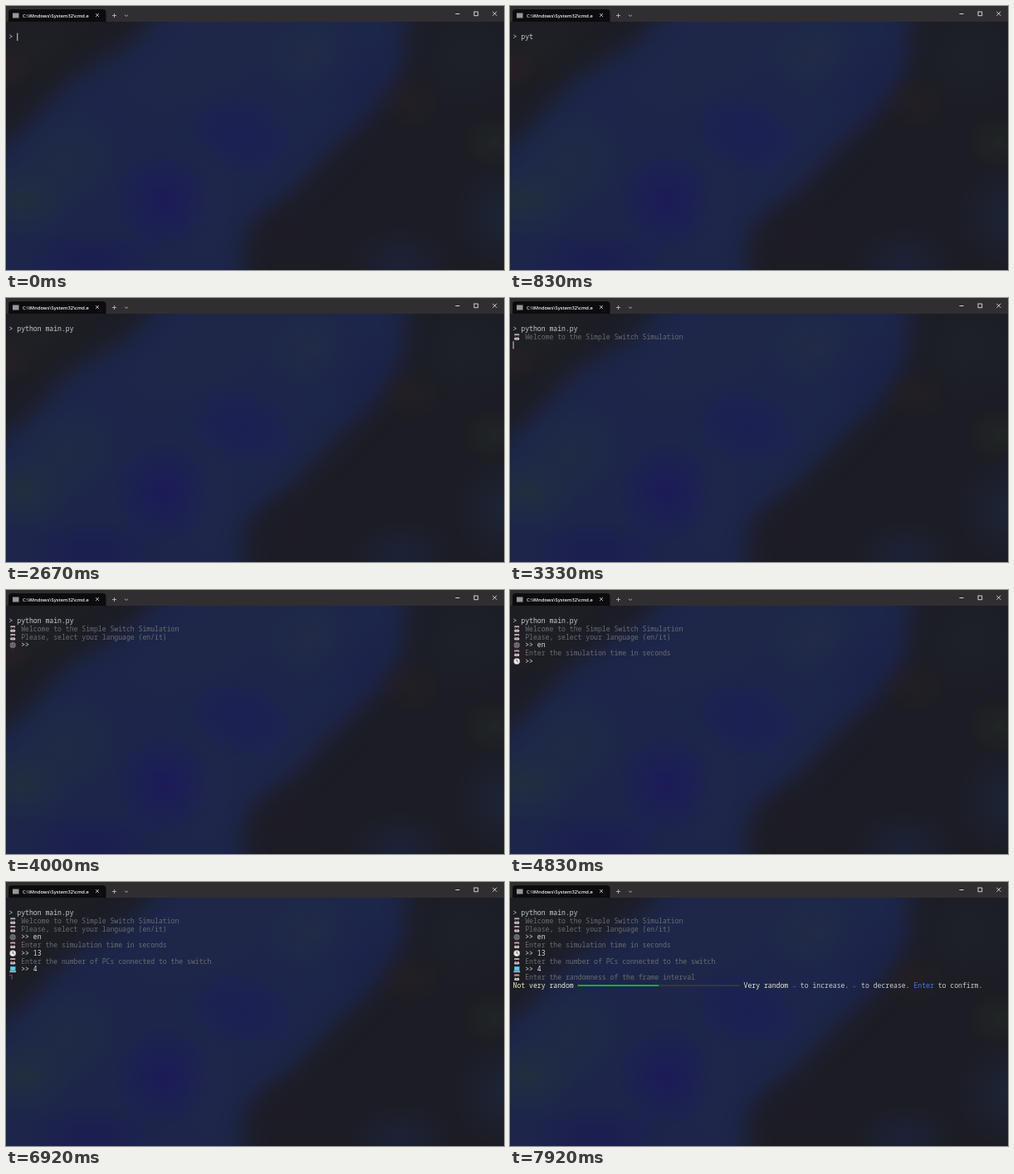
These frames come from a looping animation (600 by 319 pixels, 8000 ms). An HTML page with a canvas:

```html
<!DOCTYPE html>
<html lang="en">
<head>
<meta charset="utf-8">
<title>Terminal session</title>
<style>
html, body { margin: 0; width: 100%; height: 100%; overflow: hidden; background: #1d1f25; }
canvas { display: block; width: 600px; height: 319px; }
</style>
</head>
<body>
<canvas id="stage"></canvas>
<script>
const W = 600, H = 319, LOOP = 8000, FPS = 12;
const COL = 4.878, ROW = 9.75, LEFT = 3.5, TOP = 32.5;
const MONO = '8.13px "Noto Sans Mono", "DejaVu Sans Mono", monospace';
const TEXT = '#cbccce', DIM = '#6b6d72', BRIGHT = '#dedfe1', BLUE = '#3f7be6', CREAM = '#eeeec6';

const canvas = document.getElementById('stage');
const scale = window.devicePixelRatio || 1;
canvas.width = W * scale;
canvas.height = H * scale;
const ctx = canvas.getContext('2d');

const colX = col => LEFT + col * COL;
const rowY = row => TOP + row * ROW;

// Blurred wallpaper behind the terminal: one blue band plus soft blobs.
const band = [[215, -30], [150, 45], [75, 90], [15, 155], [-40, 190], [-40, 360],
  [283, 360], [287, 280], [352, 218], [430, 137], [478, 72], [488, -30]];
// x, y, radius x, radius y, tilt, colour, strength
const blobs = [
  [70, 190, 75, 60, -0.6, '32,44,66', 0.75],
  [20, 235, 60, 45, 0, '34,48,60', 0.8],
  [250, 60, 140, 60, -0.5, '32,40,70', 0.7],
  [370, 60, 65, 50, 0, '34,45,68', 0.75],
  [285, 155, 80, 55, 0.3, '27,29,88', 0.75],
  [190, 235, 65, 65, 0.2, '27,24,92', 0.85],
  [105, 305, 95, 40, 0, '26,25,82', 0.7],
  [248, 245, 32, 80, 0.1, '33,38,76', 0.6],
  [425, 90, 60, 85, 0.5, '26,32,78', 0.5],
  [30, 50, 90, 50, -0.5, '31,33,37', 0.8],
  [0, 75, 32, 26, 0, '48,30,38', 0.6],
  [485, 115, 40, 32, 0, '44,33,38', 0.45],
  [555, 60, 80, 70, 0, '30,34,41', 0.7],
  [590, 165, 40, 32, 0, '36,42,38', 0.6],
  [600, 255, 60, 65, 0, '28,38,60', 0.8],
  [475, 310, 60, 42, 0, '27,36,62', 0.8],
  [340, 275, 60, 50, 0, '29,27,37', 0.7]
];

function blob(c, [x, y, rx, ry, tilt, rgb, alpha]) {
  c.save();
  c.translate(x, y);
  c.rotate(tilt);
  c.scale(rx, ry);
  const g = c.createRadialGradient(0, 0, 0, 0, 0, 1);
  g.addColorStop(0, `rgba(${rgb},${alpha})`);
  g.addColorStop(0.5, `rgba(${rgb},${alpha * 0.5})`);
  g.addColorStop(1, `rgba(${rgb},0)`);
  c.fillStyle = g;
  c.fillRect(-1, -1, 2, 2);
  c.restore();
}

function paintBackdrop() {
  const layer = document.createElement('canvas');
  layer.width = W;
  layer.height = H;
  const c = layer.getContext('2d');
  c.fillStyle = '#1c1d24';
  c.fillRect(0, 0, W, H);
  c.filter = 'blur(15px)';
  c.fillStyle = '#1d264a';
  c.beginPath();
  band.forEach(([x, y]) => c.lineTo(x, y));
  c.fill();
  c.filter = 'none';
  blobs.forEach(b => blob(c, b));
  return layer;
}
const backdrop = paintBackdrop();

function box(x, y, w, h, color, r = 0) {
  ctx.fillStyle = color;
  ctx.beginPath();
  ctx.roundRect(x, y, w, h, r);
  ctx.fill();
}

function disc(x, y, r, color) {
  ctx.fillStyle = color;
  ctx.beginPath();
  ctx.arc(x, y, r, 0, Math.PI * 2);
  ctx.fill();
}

// Each path is a flat list of x, y pairs.
function stroke(color, width, ...paths) {
  ctx.strokeStyle = color;
  ctx.lineWidth = width;
  ctx.beginPath();
  for (const p of paths) {
    ctx.moveTo(p[0], p[1]);
    for (let i = 2; i < p.length; i += 2) ctx.lineTo(p[i], p[i + 1]);
  }
  ctx.stroke();
}

function print(text, col, row, color) {
  ctx.font = MONO;
  ctx.fillStyle = color;
  ctx.fillText(text, colX(col), rowY(row) + 7.5);
}

function titleBar() {
  box(0, 0, W, 19, '#302e31');
  box(3, 4, 117.5, 15, '#0c0c0e', [4, 4, 0, 0]);
  box(8, 8.5, 7.5, 6, '#98989a');
  ctx.font = '600 5.7px "Open Sans", "Noto Sans", sans-serif';
  ctx.fillStyle = '#f4f4f4';
  ctx.fillText('C:\\Windows\\System32\\cmd.e', 20, 13.7);
  stroke('#d0d0d0', 0.8, [108, 9, 112, 13], [112, 9, 108, 13]);
  stroke('#c4c4c6', 0.8, [128, 11.5, 133, 11.5], [130.5, 9, 130.5, 14]);
  stroke('#c4c4c6', 0.8, [143, 10.7, 145, 12.5, 147, 10.7]);
  stroke('#e2e2e2', 0.9, [541.5, 9.5, 546.5, 9.5]);
  stroke('#e2e2e2', 0.9, [564, 7, 568.7, 7, 568.7, 11.7, 564, 11.7, 564, 6.6]);
  stroke('#e2e2e2', 0.9, [586.3, 6.8, 591.2, 11.7], [591.2, 6.8, 586.3, 11.7]);
}

const icons = {
  robot(x, y) {
    box(x - 3.2, y - 3.7, 6.4, 3, '#b9a5ab', 1.4);
    box(x - 3.9, y - 1.8, 7.8, 2.8, '#16161a', 1);
    box(x - 2.7, y - 1.1, 1.5, 1.2, '#a5444f', 0.5);
    box(x + 1.2, y - 1.1, 1.5, 1.2, '#a5444f', 0.5);
    box(x - 3, y + 0.7, 6, 3, '#d6d6d8', 1.3);
    box(x - 1.5, y + 1.8, 3, 0.7, '#55555a');
  },
  globe(x, y) {
    disc(x, y, 3.6, '#77787c');
    ctx.strokeStyle = '#4b4c52';
    ctx.lineWidth = 0.6;
    ctx.beginPath();
    ctx.ellipse(x, y, 1.5, 3.5, 0, 0, Math.PI * 2);
    ctx.stroke();
    stroke('#4b4c52', 0.6, [x - 3.5, y, x + 3.5, y]);
  },
  clock(x, y) {
    disc(x, y, 3.9, '#a9aaae');
    disc(x, y, 3.1, '#eeeeef');
    stroke('#333338', 0.8, [x, y - 2.3, x, y, x + 1.6, y + 0.9]);
  },
  laptop(x, y) {
    box(x - 3.2, y - 3.6, 6.6, 5.2, '#3a9fc4', 0.5);
    box(x - 2.5, y - 2.9, 5.2, 3.8, '#59d0ee');
    box(x - 3.9, y + 1.8, 7.8, 1.9, '#a8b4bb', 0.5);
  }
};
const icon = (name, row) => icons[name](8.2, rowY(row) + ROW / 2 - 0.1);

// Braille spinner dots as bits: left column 1-2-4, right column 8-16-32.
const spinFrames = [...'⠋⠙⠹⠸⠼⠴⠦⠧⠇⠏'].map(ch => ch.charCodeAt(0) - 0x2800);

function spinner(row, age) {
  const bits = spinFrames[Math.floor(age / 33) % spinFrames.length];
  for (let i = 0; i < 6; i++) {
    if (bits >> i & 1) {
      disc(colX(0) + 1.4 + 2.2 * Math.floor(i / 3), rowY(row) + 2.2 + 2 * (i % 3), 0.6, '#8f9da0');
    }
  }
}

const command = 'python main.py';
const keyTimes = [500, 667, 750, 917, 1000, 1167, 1250, 1333, 1333, 1417, 1583, 1917, 2000, 2000];
const ENTER = 2250, SLIDER = 7250;

// spin: spinner starts, at: text appears, keys: reply key times, done: reply entered
const steps = [
  { row: 1, spin: 2833, at: 3250, say: 'Welcome to the Simple Switch Simulation' },
  { row: 2, spin: 3417, at: 3833, say: 'Please, select your language (en/it)',
    icon: 'globe', reply: 'en', keys: [4250, 4333], done: 4500 },
  { row: 4, spin: 4583, at: 4833, say: 'Enter the simulation time in seconds',
    icon: 'clock', reply: '13', keys: [5083, 5167], done: 5500 },
  { row: 6, spin: 5500, at: 5833, say: 'Enter the number of PCs connected to the switch',
    icon: 'laptop', reply: '4', keys: [6250], done: 6667 },
  { row: 8, spin: 6833, at: SLIDER, say: 'Enter the randomness of the frame interval' }
];

const typed = (text, times, t) => text.slice(0, times.filter(k => k <= t + 5).length);

function slider(row) {
  const y = rowY(row) + ROW / 2 - 0.8;
  print('Not very random', 0, row, CREAM);
  box(colX(16), y, 40 * COL, 1.6, '#3a3a3c');
  box(colX(16), y, 20 * COL, 1.6, '#17bf20');
  print('Very random', 57, row, CREAM);
  print('→', 69, row, BLUE);
  print('to increase.', 71, row, TEXT);
  print('←', 84, row, BLUE);
  print('to decrease.', 86, row, TEXT);
  print('Enter', 99, row, BLUE);
  print('to confirm.', 105, row, TEXT);
}

// Draws everything printed so far and returns the cursor cell, or null if hidden.
function session(t) {
  const since = k => t + 5 >= k;
  const line = '> ' + typed(command, keyTimes, t);
  print(line, 0, 0, TEXT);
  let cursor = since(ENTER) ? [0, 1] : [line.length, 0];
  for (const s of steps) {
    if (!since(s.spin)) break;
    if (!since(s.at)) {
      spinner(s.row, Math.max(0, t - s.spin + 1));
      return null;
    }
    icon('robot', s.row);
    print(s.say, 3, s.row, DIM);
    cursor = [0, s.row + 1];
    if (s.reply) {
      const answer = '>> ' + typed(s.reply, s.keys, t);
      icon(s.icon, s.row + 1);
      print(answer, 3, s.row + 1, BRIGHT);
      cursor = since(s.done) ? [0, s.row + 2] : [3 + answer.length, s.row + 1];
    }
  }
  if (since(SLIDER)) {
    slider(9);
    return null;
  }
  return cursor;
}

function draw(now) {
  const t = Math.floor((now % LOOP + 5) * FPS / 1000) * 1000 / FPS;
  ctx.setTransform(scale, 0, 0, scale, 0, 0);
  ctx.drawImage(backdrop, 0, 0);
  titleBar();
  const cursor = session(t);
  const lit = Math.floor((t - 415) / 530) % 2 !== 0;
  if (cursor && lit) box(colX(cursor[0]) + 0.1, rowY(cursor[1]) + 0.2, 0.9, 9.4, '#e6e6e6');
}

const start = performance.now();
function tick() {
  draw(performance.now() - start);
  requestAnimationFrame(tick);
}
tick();
</script>
</body>
</html>
```
